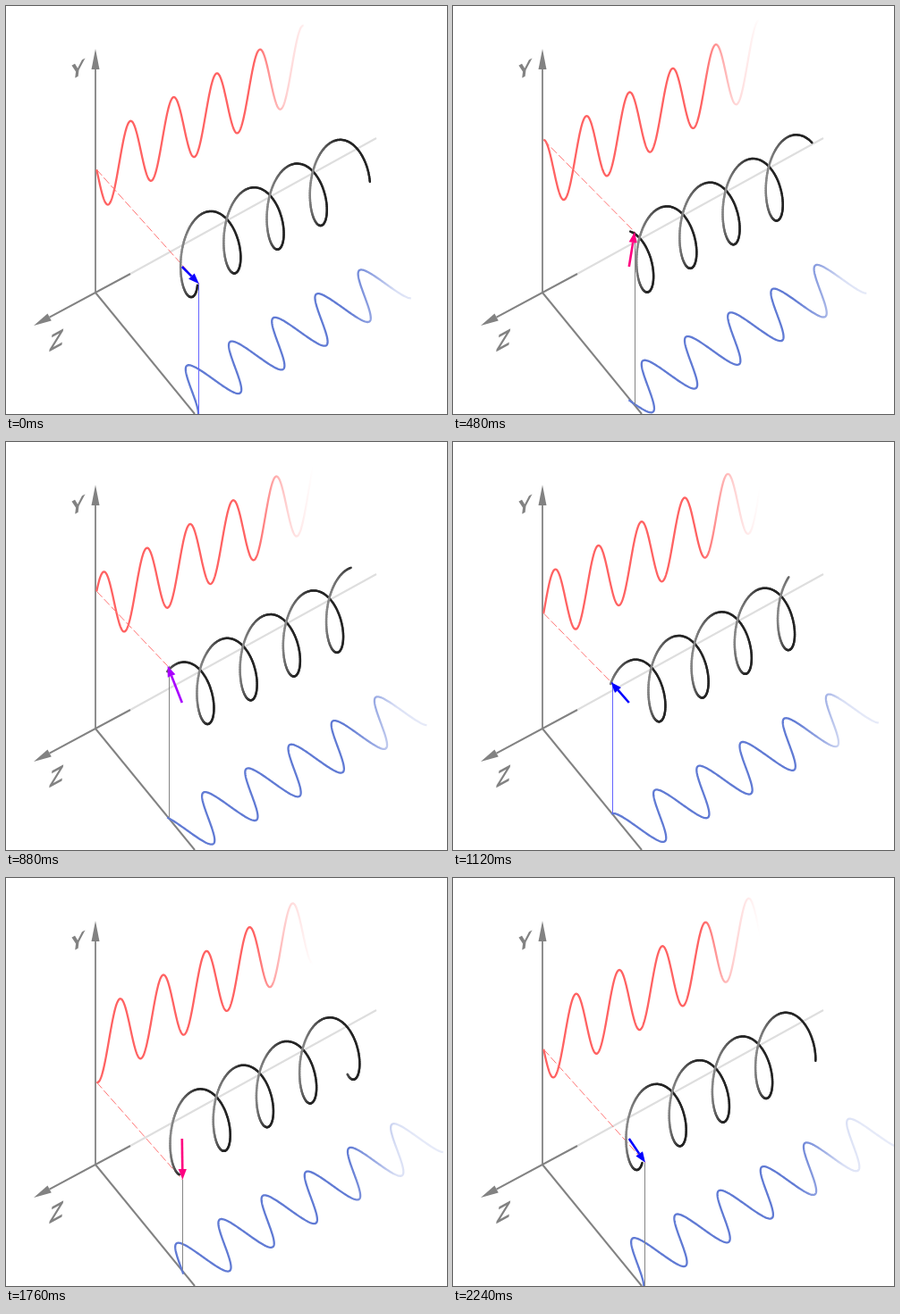
Recreate the animation shown at these times as an HTML page with a canvas. Size 493 by 457 pixels, loop 2320 ms.

```html
<!DOCTYPE html>
<html lang="en">
<head>
<meta charset="utf-8">
<title>Circular wave</title>
<style>
  html, body { margin: 0; width: 100%; height: 100%; overflow: hidden; background: #fff; }
  canvas { display: block; }
</style>
</head>
<body>
<canvas id="stage" width="493" height="457"></canvas>
<script>
const ctx = document.getElementById('stage').getContext('2d');
const { sin, cos, tan, asin, abs, PI, hypot, floor, round, max, min } = Math;
const LOOP = 2320, STEP = 80, TAU = 2 * PI;
const WAVE = [48.2, -26.7];          // screen vector of one wavelength
const CENTER = [196.8, 292];
const GREY = '#828282';

function line(x1, y1, x2, y2, color, width, dash = []) {
  ctx.strokeStyle = color;
  ctx.lineWidth = width;
  ctx.setLineDash(dash);
  ctx.beginPath();
  ctx.moveTo(x1, y1);
  ctx.lineTo(x2, y2);
  ctx.stroke();
  ctx.setLineDash([]);
}

function arrow(x1, y1, x2, y2, color, width, head, half) {
  const len = hypot(x2 - x1, y2 - y1);
  const ux = (x2 - x1) / len, uy = (y2 - y1) / len;
  const bx = x2 - ux * head, by = y2 - uy * head;
  line(x1, y1, bx, by, color, width);
  ctx.fillStyle = color;
  ctx.beginPath();
  ctx.moveTo(x2, y2);
  ctx.lineTo(bx - uy * half, by + ux * half);
  ctx.lineTo(bx + uy * half, by - ux * half);
  ctx.fill();
}

function label(text, x, y, size) {
  ctx.save();
  ctx.transform(0.95, -0.52, -0.12, 1, x, y);
  ctx.font = `bold ${size}px "Liberation Sans", Arial, sans-serif`;
  ctx.textAlign = 'center';
  ctx.fillStyle = GREY;
  ctx.fillText(text, 0, size * 0.35);
  ctx.restore();
}

// Horizontal gradient from [x, alpha] stops
function fade(rgb, stops) {
  const x0 = stops[0][0], span = stops[stops.length - 1][0] - x0;
  const g = ctx.createLinearGradient(x0, 0, x0 + span, 0);
  for (const [x, a] of stops) g.addColorStop((x - x0) / span, `rgba(${rgb},${a})`);
  return g;
}
const RED = fade('255,98,98', [[278, 1], [300, 0.55], [315, 0.27], [330, 0.13], [343, 0]]);
const BLUE = fade('96,122,212', [[382, 1], [412, 0.65], [436, 0.24], [458, 0.17], [494, 0.15]]);

function curve(point, end, color) {
  ctx.strokeStyle = color;
  ctx.lineWidth = 2.3;
  ctx.beginPath();
  for (let s = 0; s <= end; s += 0.01) ctx.lineTo(...point(s));
  ctx.stroke();
}

function helix(phase) {
  const from = 0.03 - 0.035 * cos(2 * phase - 0.3) - 0.02 * sin(phase);
  const to = 4.07 + 0.03 * sin(phase);
  const angle = s => phase - 0.25 - TAU * s;
  const at = s => {
    const a = angle(s);
    return [
      192.6 + WAVE[0] * s - 20 * sin(a) - 1.8 * cos(a),
      291 + WAVE[1] * s - 41.2 * cos(a)
    ];
  };
  ctx.lineCap = 'round';
  for (let s = from; s < to; s += 0.01) {
    const shade = 36 + 100 * max(0, sin(angle(s)));
    line(...at(s), ...at(min(s + 0.01, to)), `rgb(${shade},${shade},${shade})`, 2.5);
  }
  ctx.lineCap = 'butt';
}

function axes() {
  line(139, 300, 414, 148, '#dedede', 2);
  line(100, 321, 211, 457, GREY, 2);
  arrow(100, 321, 100, 48, GREY, 1.8, 23, 4.5);
  arrow(139, 300, 31, 358, GREY, 2, 20, 4.5);
  label('Y', 80, 71, 25);
  label('Z', 56.5, 374, 27);
}

function draw(time) {
  const turn = time / LOOP;
  const phase = TAU * (time - 520) / LOOP;
  const c = cos(phase), s = sin(phase), ripple = sin(3 * phase);
  const tip = [196 + 4.3 * c - 21 * s - 1.8 * ripple, 292 - 40 * c - 25 * s - 2 * cos(3 * phase)];

  const redAt = d => [101.3 + WAVE[0] * d, 189.7 + WAVE[1] * d - 40 * cos(phase - TAU * d)];
  const blueAt = d => {
    const k = sin(phase - TAU * d);
    return [194.6 + WAVE[0] * d - 17.4 * k, 438.9 + WAVE[1] * d - 22.2 * k];
  };

  ctx.fillStyle = '#fff';
  ctx.fillRect(0, 0, 493, 457);
  axes();
  curve(redAt, 4.8 + turn, RED);
  curve(blueAt, 5 + turn, BLUE);

  // Projection lines
  const dropX = round(196.4 + 0.94 * (tip[0] - 196.4)) + 0.5;
  line(...redAt(0), ...tip, '#ff7474', 1, [9, 3]);
  line(dropX, tip[1], dropX, 321 + 1.215 * (dropX - 100), tan(phase) < -0.7 ? '#6464ff' : '#858585', 1);

  helix(phase);

  const lift = asin(min(1, abs(c))) / (PI / 2);
  const hue = min(330, 240 + 133 * max(0, lift - 0.08));
  arrow(...CENTER, ...tip, `hsl(${hue},100%,50%)`, 2.6, 12, 4.6);
}

const start = performance.now();
function tick() {
  const time = (performance.now() - start) % LOOP;
  draw(floor(time / STEP) * STEP);
  requestAnimationFrame(tick);
}
tick();
</script>
</body>
</html>
```
